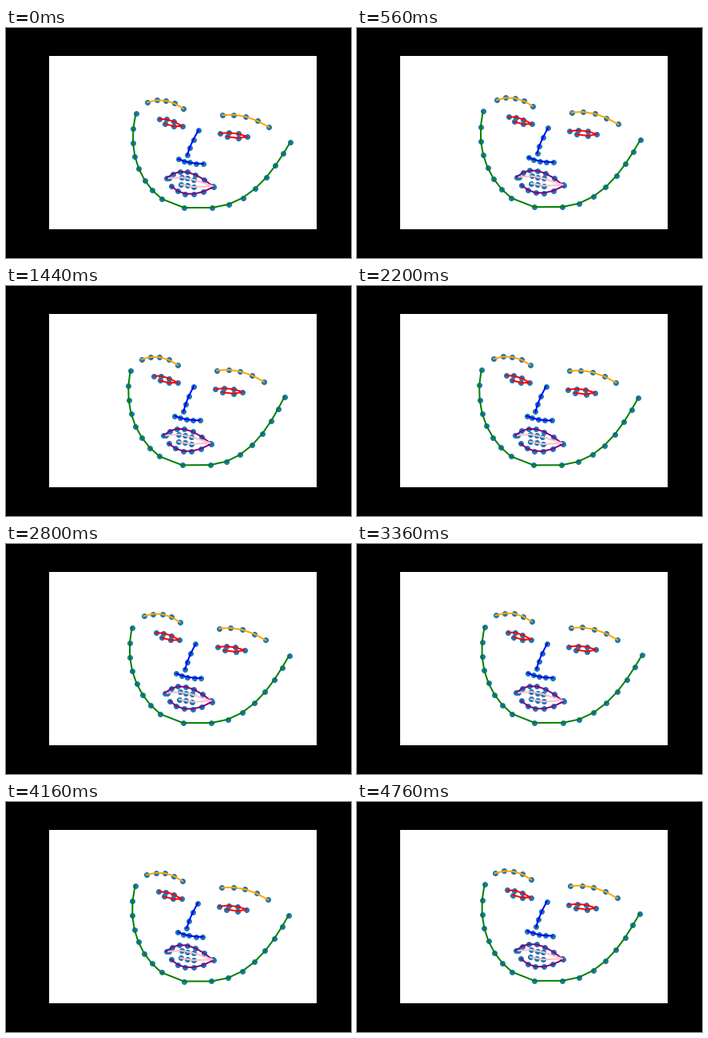
Recreate the animation shown at these times as a matplotlib script. Size 432x288 px, loop 4800 ms.

```python
import numpy as np
import matplotlib.pyplot as plt
from matplotlib.animation import FuncAnimation
from matplotlib.patches import Rectangle

W, H, DPI = 432, 288, 72
FRAMES, STEP = 120, 40


def arc(n, *keys):
    """n points spaced evenly along the polynomial through the key points."""
    coef = np.polyfit(np.linspace(0, 1, len(keys)), keys, len(keys) - 1)
    u = np.linspace(0, 1, n)
    return np.column_stack([np.polyval(c, u) for c in coef.T])


# Each stroke: colour, then the arcs it runs through.
FACE = [
    # jaw
    ("green", arc(8, (162.5, 107), (159.5, 149.5), (171, 186), (195, 214)),
     arc(1, (223, 225)),
     arc(8, (258, 225), (302, 209), (333.5, 177.5), (356, 143))),
    # brows
    ("orange", arc(5, (177, 93), (200, 91), (222, 101))),
    ("orange", arc(5, (271, 109), (300, 111), (329, 124))),
    # nose
    ("blue", arc(4, (241, 128), (232, 145), (227, 159))),
    ("blue", arc(5, (216, 164), (230, 168.5), (247, 170))),
    # eyes
    ("red", arc(4, (192, 114), (205.5, 115.5), (221, 123)), arc(2, (210, 123), (199, 120))),
    ("red", arc(4, (268, 132), (285, 131.5), (302, 136)), arc(2, (291, 138), (277, 136))),
    # lips
    ("purple", arc(7, (201, 188), (227, 180.5), (260, 199)),
     arc(5, (247, 205), (224.5, 207.5), (207, 198))),
    ("pink", arc(1, (204, 188)), arc(3, (220, 187), (235, 190)),
     arc(1, (259, 198)), arc(3, (235, 199), (219, 196))),
]

# Head pose: ms, sway of the face, of the left and right jaw, nod on the left and right.
POSES = np.array([
    (0, 0, 0, 0, 0, 0),
    (280, -1, -3, 2.5, -1.3, -2.4),
    (560, -2.2, -5, -1.3, -2.6, -4.2),
    (1440, -7, -7, -9.5, -0.8, -5.5),
    (2200, -5.2, -7, -5, -1.6, -3.6),
    (3360, -3.2, -3, 1, -3.4, -4.8),
    (4160, -0.9, -1, -2.5, -1.7, -1.8),
    (4760, -3.9, -3, -2.6, -3.6, -4.4),
])

parts = [np.vstack(arcs) for _, *arcs in FACE]
rest = np.vstack(parts)
splits = np.cumsum([len(p) for p in parts])[:-1]
is_jaw = np.arange(len(rest)) < len(parts[0])
side = (rest[:, 0] - 163) / 193         # 0 at the left jaw, 1 at the right
reach = 1 - (rest[:, 1] - 104) / 170    # motion fades towards the chin


def blend(left, right):
    return left + (right - left) * side


def landmarks(ms):
    sway, jaw_l, jaw_r, nod_l, nod_r = (np.interp(ms, POSES[:, 0], c) for c in POSES[:, 1:].T)
    dx = np.where(is_jaw, blend(jaw_l, jaw_r), sway)
    dy = blend(nod_l, nod_r)
    return rest + np.column_stack([dx, dy]) * reach[:, None]


fig = plt.figure(figsize=(W / DPI, H / DPI), dpi=DPI, facecolor="black")
ax = fig.add_axes([0, 0, 1, 1])
ax.set_xlim(0, W)
ax.set_ylim(H, 0)
ax.axis("off")
ax.add_patch(Rectangle((54, 35), 335, 217, fc="white", ec="none", zorder=0))

dots = ax.scatter(*rest.T, s=36, color="C0", zorder=1)
strokes = [ax.plot([], [], color=color, lw=2, zorder=2)[0] for color, *_ in FACE]


def update(i):
    points = landmarks(i * STEP)
    dots.set_offsets(points)
    for stroke, part in zip(strokes, np.split(points, splits)):
        stroke.set_data(*part.T)
    return [dots, *strokes]


anim = FuncAnimation(fig, update, frames=FRAMES, interval=STEP, repeat=True, repeat_delay=0)
plt.show()
```
